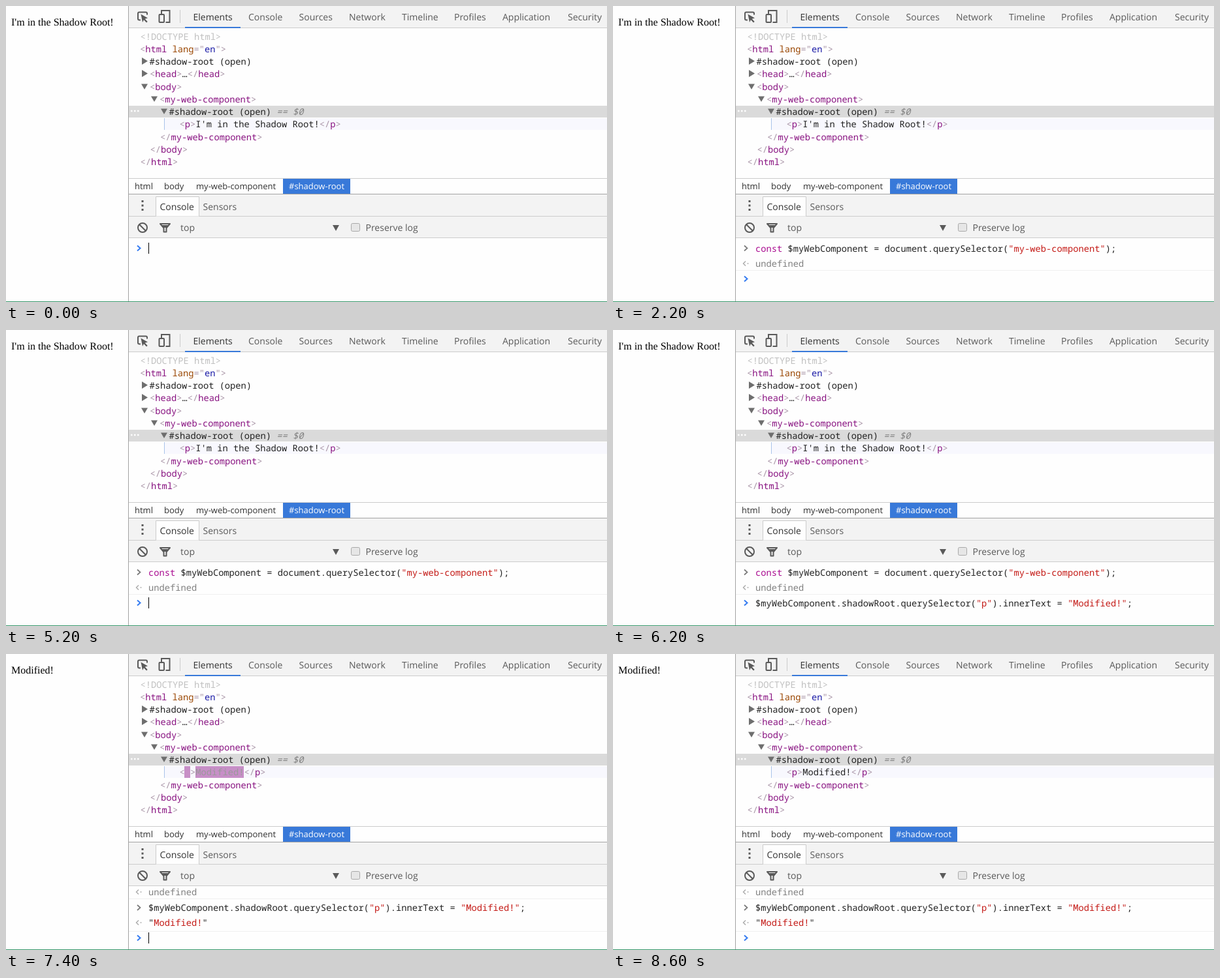
Write an HTML page that moves like this. It is 920 by 454 pixels and loops after 8800 ms.

```html
<!DOCTYPE html>
<html lang="en">
<head>
<meta charset="utf-8">
<title>Shadow root console</title>
<style>
html, body { margin: 0; width: 100%; height: 100%; overflow: hidden; background: #fefefe; }
svg { display: block; }
text { white-space: pre; text-rendering: geometricPrecision; }
.page { font: 16px "Liberation Serif", serif; fill: #000; }
.ui { font: 14px "Open Sans", sans-serif; fill: #5a5a5a; }
.crumb { font: 13px "Open Sans", sans-serif; fill: #303030; }
.code { font: 13.745px "Noto Sans Mono", monospace; fill: #222; }
.b { fill: #a894a6; }
.t { fill: #881280; }
.s { fill: #c41a16; }
.k { fill: #aa0d91; }
.g { fill: #808080; }
.bar { fill: #f3f3f3; }
.rule { fill: #ccc; }
.split { fill: #a3a3a3; }
.tri { fill: #6e6e6e; }
.icon { fill: none; stroke: #5a5a5a; stroke-width: 2; }
.out { fill: none; stroke: #a8a8a8; stroke-width: 1.4; }
.arrow { fill: none; stroke: #7a7a7a; stroke-width: 1.7; }
#prompt { stroke: #367cf1; stroke-width: 2; }
</style>
</head>
<body>
<svg width="920" height="454" viewBox="0 0 920 454">
  <defs>
    <clipPath id="view"><path d="M188 356h732v97h-732z"/></clipPath>
    <path id="down" d="M-5 -4h10l-5 8.5z"/>
    <path id="right" d="M-4 -5.5v11l9 -5.5z"/>
    <path id="chevron" d="M201 -4l4.5 4l-4.5 4"/>
    <g id="reply"><path d="M203 -3.5l-3.5 3.5l3.5 3.5"/><path d="M205.5 0h2"/></g>
  </defs>
  <rect width="920" height="454" fill="#fefefe"/>

  <text class="page" x="8" y="30" data-to="7000">I'm in the Shadow Root!</text>
  <text class="page" x="8" y="30" data-from="7000">Modified!</text>

  <!-- main toolbar -->
  <rect class="bar" x="188" width="732" height="33"/>
  <rect class="rule" x="188" y="33" width="732" height="1"/>
  <rect class="rule" x="266" y="6" width="1" height="20"/>
  <rect x="274" y="32" width="85" height="2" fill="#3879d9"/>
  <path class="icon" stroke-width="1.6" d="M206 21.5h-2q-2 0 -2 -2v-8q0 -2 2 -2h10q2 0 2 2v2"/>
  <path d="M206.500 12.500l10.500 6l-4.300 1.200l4 4.200l-1.700 1.600l-4 -4.200l-2 3.600z" fill="#5a5a5a"/>
  <path class="icon" d="M238 12v-5h12.500v18h-6"/>
  <rect class="icon" x="234.500" y="13" width="7.500" height="12" rx="1"/>
  <g class="ui" id="tabs"></g>

  <!-- element tree -->
  <rect x="188" y="153" width="732" height="18" fill="#dadada"/>
  <rect x="243" y="172" width="677" height="18" fill="#f8f8fe"/>
  <rect x="242" y="172" width="1" height="18" fill="#a9c4ea"/>
  <path d="M191 161h2.500m2.500 0h2.500m2.500 0h2.500" stroke="#fff" stroke-width="2.500"/>
  <g class="tri">
    <use href="#right" x="212" y="84.500"/>
    <use href="#right" x="212" y="103.500"/>
    <use href="#down" x="212" y="123.500"/>
    <use href="#down" x="227" y="142.500"/>
    <use href="#down" x="242" y="161.500"/>
  </g>
  <g class="code">
    <text x="205.500" y="52" fill="#c0c0c0">&lt;!DOCTYPE html&gt;</text>
    <text x="205" y="71"><tspan class="b">&lt;</tspan><tspan class="t">html</tspan> <tspan fill="#994500">lang</tspan><tspan class="b">="</tspan><tspan fill="#1a1aa6">en</tspan><tspan class="b">"&gt;</tspan></text>
    <text x="219.500" y="90">#shadow-root (open)</text>
    <text x="220" y="109"><tspan class="b">&lt;</tspan><tspan class="t">head</tspan><tspan class="b">&gt;</tspan>…<tspan class="b">&lt;/</tspan><tspan class="t">head</tspan><tspan class="b">&gt;</tspan></text>
    <text x="220" y="129"><tspan class="b">&lt;</tspan><tspan class="t">body</tspan><tspan class="b">&gt;</tspan></text>
    <text x="235" y="148"><tspan class="b">&lt;</tspan><tspan class="t">my-web-component</tspan><tspan class="b">&gt;</tspan></text>
    <text x="249.500" y="167">#shadow-root (open)<tspan class="g" font-style="italic"> == $0</tspan></text>
    <text x="265.500" y="186" data-to="7200"><tspan class="b">&lt;</tspan><tspan class="t">p</tspan><tspan class="b">&gt;</tspan>I'm in the Shadow Root!<tspan class="b">&lt;/</tspan><tspan class="t">p</tspan><tspan class="b">&gt;</tspan></text>
    <g data-from="7200">
      <path id="glow" d="M273 172h9v18h-9zM290 172h74v18h-74z" fill="#9e3699"/>
      <text x="265.500" y="186"><tspan class="b">&lt;</tspan><tspan id="tag">p</tspan><tspan class="b">&gt;</tspan><tspan id="word">Modified!</tspan><tspan class="b">&lt;/</tspan><tspan class="t">p</tspan><tspan class="b">&gt;</tspan></text>
    </g>
    <text x="236" y="206"><tspan class="b">&lt;/</tspan><tspan class="t">my-web-component</tspan><tspan class="b">&gt;</tspan></text>
    <text x="220.500" y="225"><tspan class="b">&lt;/</tspan><tspan class="t">body</tspan><tspan class="b">&gt;</tspan></text>
    <text x="205.500" y="244"><tspan class="b">&lt;/</tspan><tspan class="t">html</tspan><tspan class="b">&gt;</tspan></text>
  </g>

  <!-- breadcrumbs -->
  <rect class="rule" x="188" y="264" width="732" height="1"/>
  <rect x="424" y="265" width="103" height="23" fill="#3879d9"/>
  <g class="crumb">
    <text x="197" y="281">html</text>
    <text x="242" y="281">body</text>
    <text x="291" y="281">my-web-component</text>
    <text x="433" y="281" fill="#fff" style="fill:#fff">#shadow-root</text>
  </g>

  <!-- drawer -->
  <rect class="bar" x="188" y="289" width="732" height="66"/>
  <rect class="split" x="188" y="288" width="732" height="1"/>
  <rect class="rule" x="188" y="322" width="732" height="1"/>
  <rect class="rule" x="188" y="355" width="732" height="1"/>
  <path d="M229.500 322.500v-30h66v30" fill="#fefefe" stroke="#ccc"/>
  <path d="M207.500 298h3v3h-3zm0 6.500h3v3h-3zm0 6.500h3v3h-3z" fill="#5a5a5a"/>
  <circle class="icon" cx="209" cy="340" r="7"/>
  <path class="icon" d="M204 335l10 10"/>
  <path class="icon" stroke-linejoin="round" d="M236 334h15l-5.500 6.500v6h-4v-6z"/>
  <path d="M238 336h11l-3 4h-5z" fill="#5a5a5a"/>
  <path d="M500 336h10l-5 9z" fill="#5a5a5a"/>
  <rect x="528.500" y="333.500" width="13" height="12" rx="2" fill="#e6e6e6" stroke="#a8a8a8"/>
  <g class="ui">
    <text x="235.500" y="313" style="fill:#333">Console</text>
    <text x="301.500" y="313">Sensors</text>
    <text x="267" y="345">top</text>
    <text x="550.500" y="345">Preserve log</text>
  </g>

  <!-- console -->
  <g clip-path="url(#view)">
    <g id="log" class="code">
      <text x="218" y="377" data-from="600"><tspan class="k">const</tspan> $myWebComponent = document.querySelector(<tspan class="s">"my-web-component"</tspan>);</text>
      <g data-from="1600">
        <use class="arrow" href="#chevron" y="371.500"/>
        <use class="out" href="#reply" y="395"/>
        <text class="g" x="218" y="400">undefined</text>
        <rect x="188" y="405" width="732" height="1" fill="#f0f0f0"/>
      </g>
      <text x="218" y="424" data-from="5600">$myWebComponent.shadowRoot.querySelector(<tspan class="s">"p"</tspan>).innerText = <tspan class="s">"Modified!"</tspan>;</text>
      <g data-from="7000">
        <use class="arrow" href="#chevron" y="419"/>
        <use class="out" href="#reply" y="442"/>
        <text x="218" y="447">"<tspan class="s">Modified!</tspan>"</text>
        <rect x="188" y="455" width="732" height="1" fill="#f0f0f0"/>
      </g>
      <use id="prompt" class="arrow" href="#chevron"/>
      <rect id="caret" width="1" height="17" fill="#000"/>
    </g>
  </g>
  <rect class="split" x="187" width="1" height="453"/>
  <rect id="edge" y="453" width="920" height="1"/>
</svg>
<script>
const LOOP = 8800, STEP = 200;
const $ = id => document.getElementById(id);
const set = (id, attrs) => {
  for (const name in attrs) $(id).setAttribute(name, attrs[name]);
};
const mix = (a, b, p) => `rgb(${a.map((v, i) => Math.round(v + (b[i] - v) * p))})`;
const within = (t, spans) => spans.some(([from, to]) => t >= from && t < to);

const tabs = { Elements: 286.5, Console: 371, Sources: 448.5, Network: 525, Timeline: 606,
  Profiles: 686, Application: 760, Security: 860 };
$("tabs").innerHTML = Object.entries(tabs).map(([name, x]) =>
  `<text x="${x}" y="22"${name === "Elements" ? ' style="fill:#333"' : ""}>${name}</text>`).join("");

const timed = [...document.querySelectorAll("[data-from], [data-to]")];
const caretOn = [[0, 400], [600, 1200], [1600, 2200], [5200, 6200], [6600, 7600], [8000, 8600]];

// cubic-bezier(0, 0, 0.2, 1)
function easeOut(x) {
  let lo = 0, hi = 1;
  for (let i = 0; i < 20; i++) {
    const u = (lo + hi) / 2;
    if (0.6 * u * u + 0.4 * u ** 3 < x) lo = u; else hi = u;
  }
  return 3 * lo * lo - 2 * lo ** 3;
}

function draw(now) {
  const t = Math.floor(now % LOOP / STEP) * STEP;
  for (const el of timed) {
    const { from = 0, to = LOOP } = el.dataset;
    el.style.display = t >= from && t < to ? "" : "none";
  }

  const row = t < 1600 ? 0 : t < 7000 ? 47 : 94;
  const typed = t >= 600 && t < 1600 ? 552 : t >= 5600 && t < 7000 ? 577 : 0;
  set("log", { transform: `translate(0 ${t < 7000 ? 0 : -30})` });
  set("prompt", { y: 371.5 + row });
  set("caret", { x: 218 + typed, y: 363 + row, opacity: within(t, caretOn) ? 1 : 0 });
  set("edge", { fill: within(t, [[2800, 5200]]) ? "#444" : "#35966a" });

  const fade = easeOut(Math.min(1, Math.max(0, (t - 7150) / 1400)));
  const white = [255, 255, 255];
  set("glow", { opacity: 1 - fade });
  set("tag", { fill: mix(white, [136, 18, 128], fade) });
  set("word", { fill: mix(white, [34, 34, 34], fade) });
}

const start = performance.now();
function tick() {
  draw(performance.now() - start);
  requestAnimationFrame(tick);
}
tick();
</script>
</body>
</html>
```
